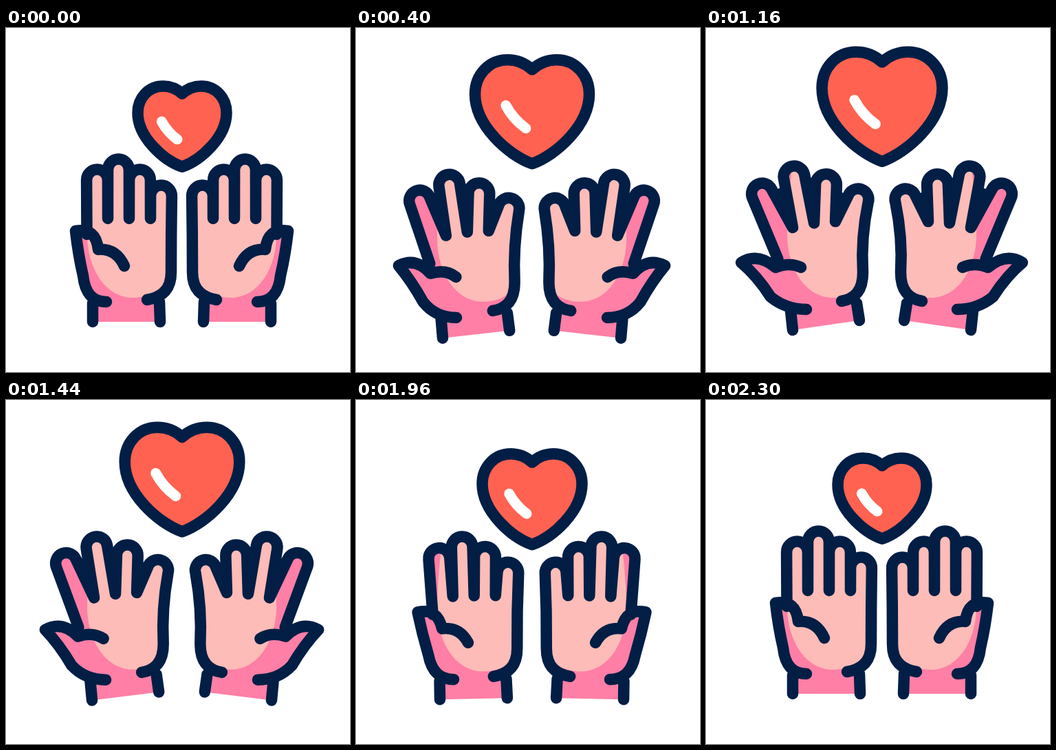
Write an HTML page with a canvas that moves like this. It is 500x500 px and loops after 2.5 s.

```html
<!DOCTYPE html>
<html lang="en">
<head>
<meta charset="utf-8">
<title>Caring hands</title>
<style>
html, body { margin: 0; width: 100%; height: 100%; overflow: hidden; background: #fff; }
canvas { display: block; width: 500px; height: 500px; }
</style>
</head>
<body>
<canvas id="stage" width="500" height="500"></canvas>
<script>
const ctx = document.getElementById('stage').getContext('2d');
const NAVY = '#021e45', SKIN = '#fdbcb7', PINK = '#ff7fa6', RED = '#ff6250';
const LOOP = 2500, LINE = 16.5, FINGER = 15.4, MIRROR = 511;

const linear = k => k;
const smooth = k => k * k * (3 - 2 * k);
const mix = (a, b, k) => a.map((v, i) => v + (b[i] - v) * k);

// [time, easing towards it, [spread, hand x, hand y, heart width, heart y]]
const rest = [0, 0, 0, 129, 142.5];
const keys = [
  [0, linear, rest],
  [100, linear, rest],
  [360, smooth, [0.77, 0, 15.2, 165.5, 121.3]],
  [1340, linear, [1.05, 0, -3.4, 177, 111.7]],
  [1660, smooth, [0.26, -4, 7.5, 133, 124.5]],
  [1840, smooth, [0.54, -2, 14, 155, 147]],
  [1960, smooth, [0.15, -4, 6.5, 145, 143.5]],
  [2300, linear, rest],
  [LOOP, linear, rest]
];

function stateAt(t) {
  const i = keys.findIndex(k => k[0] > t);
  const [t0, , from] = keys[i - 1], [t1, ease, to] = keys[i];
  return mix(from, to, ease((t - t0) / (t1 - t0)));
}

const light = new Path2D('M126 195Q118 260 118 300C118 350 145 392 184 392C228 392 245 360 245 310V180Z');
const heartShape = 'M0-.73C-.12-.84-.27-.9-.43-.9C-.76-.9-1-.63-1-.3C-1 .25-.42 .77 0 .92' +
  'C.42 .77 1 .25 1-.3C1-.63 .76-.9 .43-.9C.27-.9 .12-.84 0-.73Z';
const shine = 'M-.46-.1Q-.33 .14-.11 .3';

function stroke(path, color = NAVY, width = LINE) {
  ctx.strokeStyle = color;
  ctx.lineWidth = width;
  ctx.stroke(path);
}

// Joints of the left hand: resting place plus travel when fully spread
function handJoints(spread, x, y) {
  const at = (px, py, dx, dy) => [px + dx * spread + x, py + dy * spread + y];
  return {
    tips: [221, 206, 221, 244].map((top, i) => at(132.5 + 31 * i, top, 15.5 * i - 51, 20 / (i + 1))),
    valleys: [0, 1, 2].map(i => at(148 + 31 * i, 277, -22, 13 / (i + 1))),
    base: at(117.5, 300, -13, 36),
    side: at(240, 300, -15, 5),
    low: at(240, 355, -12, 0),
    heel: at(205, 395, -8, 2),
    thumb: at(101, 295, -50, 46),
    bend: at(131, 290, -56, 36),
    cusp: at(134, 322, -33, 26),
    bend2: at(160, 320, -38, 20),
    crease: at(172, 346, -34, 2),
    thumbSide: at(105, 330, -31, 30),
    ball: at(112, 360, -18, 31),
    corner: at(116, 398, 0, 11),
    ballEnd: at(146, 398, 0, 11),
    wristL: [at(126, 400, -3, 11), at(126, 427, 0, 12)],
    wristR: [at(223, 398, -4, 2), at(224, 427, -1, -2)]
  };
}

function fingerOutline(path, { tips, valleys, base, side, low, heel }) {
  const roots = [base, ...valleys, side];
  path.moveTo(...base);
  tips.forEach(([x, y], i) => {
    const [rx, ry] = mix(roots[i], roots[i + 1], 0.5);
    const dir = Math.atan2(y - ry, x - rx);
    path.arc(x, y, FINGER, dir - Math.PI / 2, dir + Math.PI / 2);
    if (i < 3) path.lineTo(...valleys[i]);
  });
  path.quadraticCurveTo(...side, ...low);
  path.bezierCurveTo(low[0], low[1] + 28, heel[0] + 18, heel[1] - 3, ...heel);
}

function drawHand(spread, x, y) {
  const h = handJoints(spread, x, y);

  const body = new Path2D();
  fingerOutline(body, h);
  for (const p of [...h.wristR, h.wristL[1], h.wristL[0]]) body.lineTo(...p);
  body.quadraticCurveTo(...h.corner, ...h.ball);
  body.quadraticCurveTo(...h.thumbSide, ...h.thumb);
  body.quadraticCurveTo(...h.bend, ...h.cusp);
  body.closePath();
  ctx.fillStyle = PINK;
  ctx.fill(body);
  ctx.save();
  ctx.clip(body);
  ctx.translate(0, y * 0.4);
  ctx.fillStyle = SKIN;
  ctx.fill(light);
  ctx.restore();

  const lines = new Path2D();
  fingerOutline(lines, h);
  // Close the gaps between spread fingers
  h.valleys.forEach((v, i) => {
    lines.moveTo(...v);
    lines.lineTo(...mix(v, mix(h.tips[i], h.tips[i + 1], 0.5), 0.8));
  });
  lines.moveTo(...h.crease);
  lines.quadraticCurveTo(...h.bend2, ...h.cusp);
  lines.quadraticCurveTo(...h.bend, ...h.thumb);
  lines.quadraticCurveTo(...h.thumbSide, ...h.ball);
  lines.quadraticCurveTo(...h.corner, ...h.ballEnd);
  for (const [top, end] of [h.wristL, h.wristR]) {
    lines.moveTo(...top);
    lines.lineTo(...end);
  }
  stroke(lines);
}

function drawHeart(width, y) {
  const place = shape => {
    const path = new Path2D();
    path.addPath(new Path2D(shape), new DOMMatrix([width / 2, 0, 0, width / 2, 256, y]));
    return path;
  };
  const outline = place(heartShape);
  ctx.fillStyle = RED;
  ctx.fill(outline);
  stroke(outline);
  stroke(place(shine), '#fff', 15);
}

function draw(now) {
  const [spread, x, y, heartWidth, heartY] = stateAt(now % LOOP);
  ctx.setTransform(1, 0, 0, 1, 0, 0);
  ctx.fillStyle = '#fff';
  ctx.fillRect(0, 0, 500, 500);
  ctx.lineCap = ctx.lineJoin = 'round';
  drawHeart(heartWidth, heartY);
  drawHand(spread, x, y);
  ctx.setTransform(-1, 0, 0, 1, MIRROR, 0);
  drawHand(spread, x, y);
}

const start = performance.now();
function tick() {
  draw(performance.now() - start);
  requestAnimationFrame(tick);
}
tick();
</script>
</body>
</html>
```
